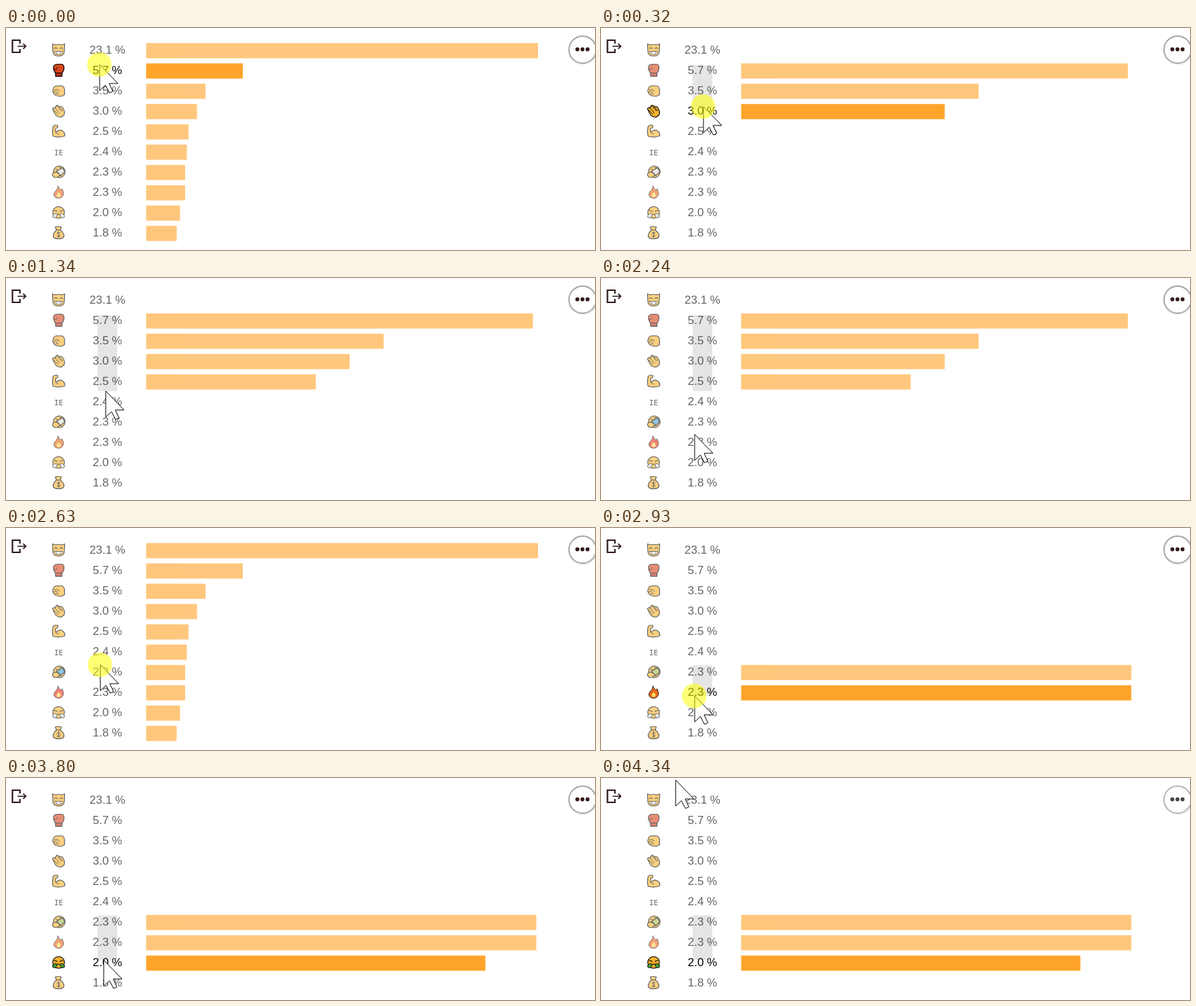
Write an HTML page that moves like this. It is 868 by 328 pixels and loops after 4420 ms.

```html
<!DOCTYPE html>
<html lang="en">
<head>
<meta charset="utf-8">
<title>Reaction chart</title>
<style>
html, body { margin: 0; width: 100%; height: 100%; overflow: hidden; background: #fff; }
svg { display: block; width: 868px; height: 328px; }
.value { font: 17px "Liberation Sans", Arial, sans-serif; text-anchor: middle; }
.code { font: 11px "DejaVu Sans Mono", monospace; text-anchor: middle; }
.icon { stroke: #000; stroke-width: 1.2; stroke-linejoin: round; stroke-linecap: round; fill: none; }
.skin { fill: #f9b32f; }
.bar { fill: #ffa42b; }
</style>
</head>
<body>
<svg viewBox="0 0 868 328">
  <g fill="none" stroke="#2e1717" stroke-width="2.2">
    <path d="M20.5 23V18H9.5V36H20.5V31"/>
    <path d="M17 27H29M25.3 23.2L29.2 27L25.3 30.8" stroke-width="1.7"/>
  </g>
  <circle cx="850" cy="32.8" r="21" fill="none" stroke="#eee" stroke-width="2"/>
  <circle id="ring" cx="849.7" cy="32" r="20" fill="#fff" stroke-width="1.8"/>
  <g id="dots"><circle cx="842" cy="31.5" r="2.9"/><circle cx="849.5" cy="31.5" r="2.9"/><circle cx="857" cy="31.5" r="2.9"/></g>
  <g id="rows"></g>
  <rect id="brush" x="135" width="29" fill="#000" opacity=".1"/>
  <path id="cursor" d="M0 0V38.5L8.5 30.5L14.5 42L19.5 39.7L14 28H27Z" fill="#fff" stroke="#000"/>
  <circle id="press" r="18" fill="#ff0"/>
</svg>
<script>
const LOOP = 4420;
const RELEASE = 3800;
const values = [23.1, 5.7, 3.5, 3.0, 2.5, 2.4, 2.3, 2.3, 2.0, 1.8];
const face = '<circle class="skin" r="8.6"/>';

const icons = [
  `<path class="skin" d="M-8.5 1L-9 -9L-4.5 -7.5Q0 -9 4.5 -7.5L9 -9L8.5 1Q8.5 9 0 9T-8.5 1Z"/>
   <path d="M-6 -2q2 -2.6 4 0M2 -2q2 -2.6 4 0"/>
   <path d="M-6 2H6Q5 6.8 0 6.8T-6 2Z" fill="#fff" stroke-width=".9"/><path d="M-2.5 2v4M2.5 2v4" stroke-width=".7"/>`,
  `<path d="M-4.5 4Q-8 0 -7.5 -5Q-6.5 -9 -1 -9H4Q8 -9 8 -4Q8 1 5 4Z" fill="#d8481f"/>
   <path d="M-4.5 4H5V8.8H-4.5Z" fill="#b93018"/><path d="M-7 -2Q-3 1 -2 -4" stroke-width=".9"/>`,
  `<path class="skin" d="M-7.5 -3Q-7 -6.5 -3 -7H4Q8.5 -6.5 8.8 -1V6L4 8.5Q-4 8.5 -6.5 5Q-10 1 -7.5 -3Z"/>
   <path d="M-6 -1Q0 -3 1 1M-7 2Q-3 0 -1.5 3M-4.5 5Q-2 3.5 0 5" stroke-width=".9"/>`,
  `<path class="skin" d="M-9 -3Q-8 -6 -5 -4L-4 -7Q-1 -10 1 -6Q5 -8 7 -3Q10 1 8 6L4 9Q-2 9.5 -5 5Z"/>
   <path d="M-5 -4L1 3M1 -6L6 0M-7 -1L-1 5M-2 -7L4 0" stroke-width=".9"/>`,
  `<path class="skin" d="M-8 -7Q-6 -10 -1 -8.5L-1.5 -5L-4 -4.5Q-5 -1 -4 2Q0 -3 5 -1Q10 2 9 7Q0 10 -8 7.5Q-10 2 -8 -7Z"/>
   <path d="M-4 2Q-3 4 0 4" stroke-width=".9"/>`,
  '<text class="code" y="5">IE</text>',
  `<g transform="translate(1 0)">${face}</g><path id="tissue" d="M-3 -1L6 -6L9 0L3 6Z"/>
   <path d="M-4 -4l3 1M1 -6l3 0" stroke-width="1"/>
   <path class="skin" d="M-9 3Q-6 -1 -2 1L2 4Q0 8 -4 8.5Q-9 8 -9 3Z"/>`,
  `<path id="flame" d="M-1 -9Q1 -4 4 -3L5 -5Q8 0 7 4Q5 9 0 9Q-7 8.5 -7 3Q-6 -1 -4 -2Q-1 -5 -1 -9Z" stroke-width=".8"/>
   <path d="M0 0Q4 3 3 6Q0 9 -3 6Q-3 3 0 0Z" fill="#ffd75a" stroke="none"/>`,
  `${face}<path d="M-6 -3l4 1.5M6 -3l-4 1.5M-2 2.5h4"/>
   <path class="puff" d="M-2 3Q-5 0 -7 3Q-10 4 -8.5 7Q-5 9.5 -3 6ZM2 3Q5 0 7 3Q10 4 8.5 7Q5 9.5 3 6Z" stroke-width=".9"/>`,
  `<path class="skin" d="M-3 -4L-5 -8.5Q0 -10 4 -8.5L2.5 -4Q8 0 8 5Q7 9 0 9T-8 5Q-8 0 -3 -4Z"/>
   <path d="M-3.5 -4H3" /><path d="M2.3 .2Q-2 -1.5 -2 1Q-1 2.5 0 2.6Q3 3.5 2 5.2Q0 6.8 -2.4 5M0 -1.6V7.4" stroke-width=".9"/>`
];

// Cursor moves: start, time of last step, steps, end x, end y
const moves = [
  [80, 320, 4, 151, 116], [390, 550, 3, 150, 138], [640, 870, 4, 149, 167],
  [1020, 1180, 3, 149, 167], [1340, 1340, 1, 147, 167], [1410, 1690, 5, 142, 234],
  [2240, 2240, 1, 138, 231], [2320, 2320, 1, 138, 226], [2470, 2630, 3, 139, 202],
  [2700, 2930, 4, 138, 248], [3010, 3180, 3, 140, 267], [3560, RELEASE, 4, 144, 269],
  [3970, 4340, 6, 110, 3]
];

const $ = id => document.getElementById(id);
const set = (el, attrs) => { for (const k in attrs) el.setAttribute(k, attrs[k]); };

$('rows').innerHTML = values.map((v, i) => `<g transform="translate(0 ${30 * i})">
  <g class="icon" transform="translate(77.5 32.5)"${i === 5 ? ' style="stroke:none;fill:#000"' : ''}>${icons[i]}</g>
  <text class="value" x="149.5" y="38">${v.toFixed(1)} %</text>
  <rect class="bar" x="206.5" y="22.3" height="22.4"/></g>`).join('');
const rows = [...$('rows').children];
const bars = rows.map(r => r.querySelector('.bar'));
const puff = document.querySelector('.puff');

function stepOf(t, a, b, n) {
  if (t < a) return 0;
  return b > a ? Math.min(n, Math.floor((t - a) / (b - a) * (n - 1) + 1e-6) + 1) : n;
}

function cursorAt(t) {
  let x = 138, y = 54;
  for (const [a, b, n, toX, toY] of moves) {
    const p = stepOf(t, a, b, n) / n;
    x += (toX - x) * p;
    y += (toY - y) * p;
  }
  return { x, y };
}

function brushAt(t) {
  if (t >= 80 && t < 2550) return [55, cursorAt(Math.min(t, 1180)).y];
  if (t >= 2700) return [203, cursorAt(Math.min(t, RELEASE)).y];
  return null;
}

function pressAt(t) {
  if (t < 1200) return 1 - stepOf(t, 1020, 1180, 3) / 3;
  return t < 2550 ? 0 : 1 - stepOf(t, 3560, RELEASE, 4) / 4;
}

function draw(t) {
  const { x, y } = cursorAt(t);
  const brush = brushAt(t);
  const hoverY = cursorAt(Math.min(t, RELEASE)).y;
  const within = (i, lo, hi) => hi >= 22.5 + 30 * i && lo <= 45 + 30 * i;
  const shown = values.map((v, i) => !brush || within(i, ...brush));
  const max = Math.max(...values.filter((v, i) => shown[i]));
  const unit = max > 6 ? 25 : max > 2.4 ? 100 : 250;

  rows.forEach((row, i) => {
    const hover = within(i, hoverY, hoverY);
    set(row, { opacity: hover ? 1 : 0.61 });
    set(bars[i], { width: shown[i] ? values[i] * unit : 0 });
    if (i === 8) set(puff, { fill: hover ? '#3f9a3a' : '#d5dde0' });
  });
  set($('tissue'), { fill: t < 1560 ? '#dfe0d8' : t < 2930 ? '#4aa0cc' : '#a9bd55' });
  set($('flame'), { fill: t > 1600 && t < 2930 ? '#e8371f' : '#e8681c' });

  set($('brush'), { y: brush ? brush[0] : 0, height: brush ? brush[1] - brush[0] : 0 });
  set($('cursor'), { transform: `translate(${x} ${y})` });
  set($('press'), { cx: x - 0.5, cy: y, opacity: 0.54 * pressAt(t) });
  const late = t >= 4340;
  set($('ring'), { stroke: late ? '#b4b4b4' : '#a4a4a6' });
  set($('dots'), { fill: late ? '#484444' : '#351a1a' });
}

function tick() {
  draw(performance.now() % LOOP);
  requestAnimationFrame(tick);
}
tick();
</script>
</body>
</html>
```
